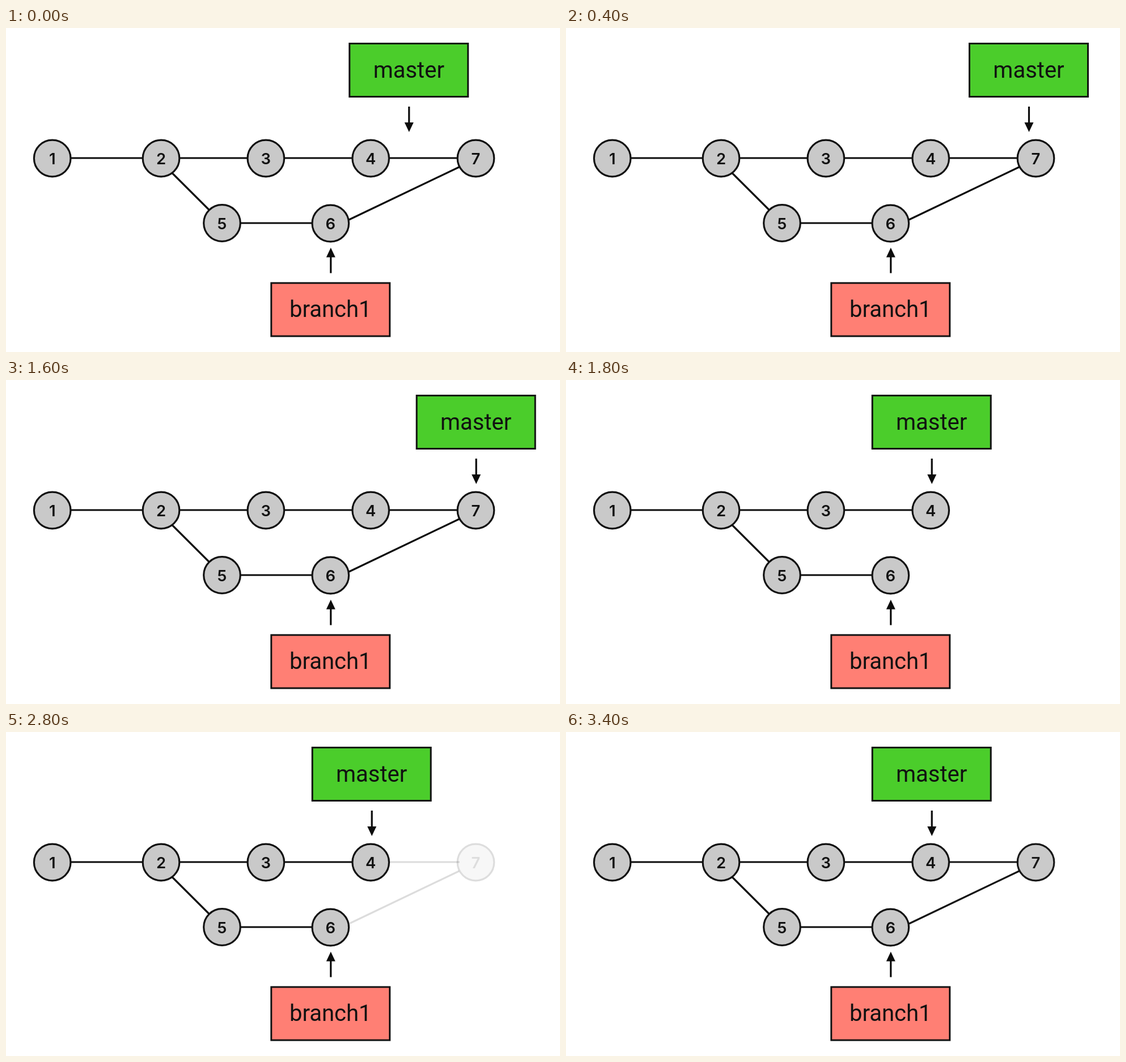
An HTML page that plays this animation: 977x573 px, repeating every 3.6 s.

```html
<!DOCTYPE html>
<html lang="en">
<head>
<meta charset="utf-8">
<title>Branch merge</title>
<style>
  html, body { margin: 0; width: 100%; height: 100%; overflow: hidden; background: #fff; }
  svg { display: block; width: 100vw; height: 100vh; }
  text { text-anchor: middle; fill: #111; }
  .node circle { fill: #c9c9c9; stroke: #111; stroke-width: 3.2; }
  .node text { font: 600 27.5px Inter, "Liberation Sans", sans-serif; }
  .label rect { stroke: #111; stroke-width: 3; }
  .label text { font: 40px Roboto, sans-serif; }
  .link { stroke: #0c0c0c; stroke-width: 3.2; }
  .arrow { fill: #0c0c0c; }
</style>
</head>
<body>
<svg id="stage" viewBox="0 0 977 573"></svg>
<script>
const LOOP = 3600, STEP = 200;
const MERGE_START = 2573, MERGE_TIME = 940, RESET = 1800;
const HOME_X = 644.7;
const SLIDE_X = [710.3, 771.5, 816, 828.7];
const stage = document.getElementById('stage');

function add(parent, tag, attrs, content = '') {
  const el = document.createElementNS('http://www.w3.org/2000/svg', tag);
  for (const [key, value] of Object.entries(attrs)) el.setAttribute(key, value);
  el.textContent = content;
  parent.append(el);
  return el;
}

function link(x1, y1, x2, y2) {
  return add(stage, 'line', { class: 'link', x1, y1, x2, y2 });
}

function node(name, x, y) {
  const g = add(stage, 'g', { class: 'node', transform: `translate(${x} ${y})` });
  add(g, 'circle', { r: 32.3 });
  add(g, 'text', { y: 10.5 }, name);
  return g;
}

// The arrow points down for dir = 1 and up for dir = -1.
function label(name, x, y, fill, dir) {
  const g = add(stage, 'g', { class: 'label', transform: `translate(${x} ${y})` });
  add(g, 'rect', { x: -104.5, y: -47, width: 209, height: 94, fill });
  add(g, 'text', { y: 13.2 }, name);
  add(g, 'path', {
    class: 'arrow',
    transform: `translate(.5 0) scale(1 ${dir})`,
    d: 'M-1.6 64.5h3.2v28h6.4L0 109.5L-8 92.5h6.4z'
  });
  return g;
}

link(114, 230, 241, 230);
link(306, 230, 426, 230);
link(491, 230, 611, 230);
link(293.5, 257, 358, 321.5);
link(414, 345, 540, 345);
const merge = [link(676, 230, 800, 230), link(605, 339, 799, 246)];

node(1, 81.7, 230.5);
node(2, 273.5, 230.5);
node(3, 458.3, 230.5);
node(4, 643.2, 230.5);
node(5, 381, 345);
node(6, 572.3, 345.5);
merge.push(node(7, 828.5, 230.5));

label('branch1', 572.3, 498, '#ff7f74', -1);
const master = label('master', HOME_X, 74.5, '#4bcd2b', 1);

function ease(u) {
  return (1 - Math.cos(Math.PI * Math.min(1, Math.max(0, u)))) / 2;
}

function render(time) {
  const t = Math.floor(time % LOOP / STEP) * STEP;
  const merged = t < RESET;
  const x = merged ? SLIDE_X[Math.min(t / STEP, SLIDE_X.length - 1)] : HOME_X;
  const opacity = merged ? 1 : ease((t - MERGE_START) / MERGE_TIME);
  master.setAttribute('transform', `translate(${x} 74.5)`);
  for (const el of merge) el.setAttribute('opacity', opacity);
}

const start = performance.now();
function tick() {
  render(performance.now() - start);
  requestAnimationFrame(tick);
}
tick();
</script>
</body>
</html>
```
